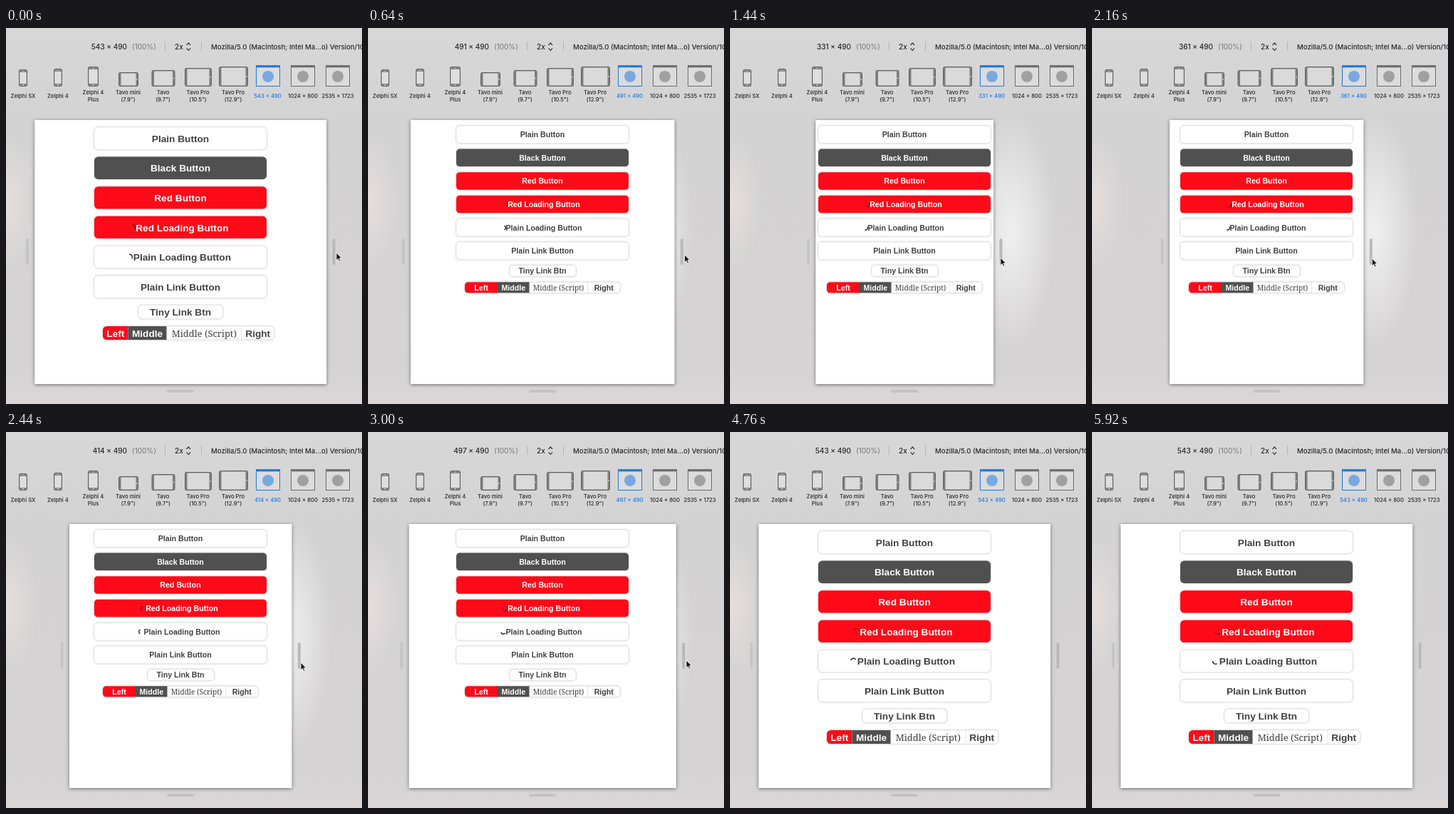
Write an HTML page that moves like this. It is 500x527 px and loops after 5960 ms.

```html
<!DOCTYPE html>
<html lang="en">
<head>
<meta charset="utf-8">
<title>Responsive buttons</title>
<style>
  html, body { margin: 0; width: 100%; height: 100%; overflow: hidden; background: #d5d4d5; }
  svg { display: block; width: 100vw; height: 100vh; }
  text { white-space: pre; }
  .ui { font-family: Inter, Roboto, sans-serif; font-weight: 500; fill: #262626; }
  .btn { font-family: "Liberation Sans", Arial, sans-serif; font-weight: 700; }
  .script { font-family: "Noto Serif", Georgia, serif; font-weight: 400; }
  #page { filter: drop-shadow(0 1px 2.5px rgba(0, 0, 0, .5)); }
  .raised { filter: drop-shadow(0 .8px .8px rgba(0, 0, 0, .26)); }
</style>
</head>
<body>
<svg id="stage" viewBox="0 0 500 527">
  <defs>
    <linearGradient id="base" x1="0" y1="0" x2="0" y2="1">
      <stop offset="0" stop-color="#d8d7d8"/>
      <stop offset=".25" stop-color="#d4d3d4"/>
      <stop offset=".9" stop-color="#d5d3d4"/>
      <stop offset="1" stop-color="#dbd6d7"/>
    </linearGradient>
    <radialGradient id="white">
      <stop offset="0" stop-color="#fff" stop-opacity=".65"/>
      <stop offset=".5" stop-color="#fff" stop-opacity=".35"/>
      <stop offset="1" stop-color="#fff" stop-opacity="0"/>
    </radialGradient>
    <radialGradient id="pink">
      <stop offset="0" stop-color="#f3e4e0" stop-opacity=".6"/>
      <stop offset="1" stop-color="#f3e4e0" stop-opacity="0"/>
    </radialGradient>
  </defs>
  <rect width="500" height="527" fill="url(#base)"/>
  <ellipse cx="395" cy="285" rx="62" ry="165" fill="url(#white)"/>
  <ellipse cx="0" cy="245" rx="45" ry="95" fill="url(#pink)"/>
</svg>
<script>
const LOOP = 5960, MID = 245.2, SCALE = 0.3775, BREAKPOINT = 500;
const RED = '#ff0a18', DARK = '#505050', INK = '#414143', BLUE = '#1b78e6';

// Rows of time, value.
const WIDTH = [[0, 543], [180, 542], [600, 499], [1000, 375], [1440, 331], [1700, 321],
  [1900, 326], [2440, 414], [3000, 497], [3320, 543], [LOOP, 543]];
const CURSOR_X = [[0, 464], [180, 463.5], [600, 448], [1000, 393], [1440, 380], [1700, 376],
  [1900, 379], [2440, 414], [3000, 447], [3320, 464], [3600, 461], [4200, 462], [LOOP, 462]];
const CURSOR_Y = [[0, 315], [1000, 320], [1440, 322], [2440, 323], [3000, 320], [3600, 316], [LOOP, 316]];
const CURSOR_GONE = 4520;

const stage = document.getElementById('stage');

function add(tag, attrs, parent = stage) {
  const el = document.createElementNS('http://www.w3.org/2000/svg', tag);
  for (const key in attrs) el.setAttribute(key, attrs[key]);
  parent.append(el);
  return el;
}

function box(x, y, width, height, fill, more = {}, parent = stage) {
  return add('rect', { x, y, width, height, fill, ...more }, parent);
}

function label(str, x, y, size, more = {}, parent = stage) {
  const el = add('text', { x, y, 'font-size': size, class: 'ui', 'text-anchor': 'middle', ...more }, parent);
  el.textContent = str;
  return el;
}

// Monotone cubic through the rows of a table.
function sample(rows, t) {
  let i = 0;
  while (i < rows.length - 2 && t >= rows[i + 1][0]) i++;
  const rise = k => (rows[k + 1][1] - rows[k][1]) / (rows[k + 1][0] - rows[k][0]);
  const slope = k => {
    if (k === 0 || k === rows.length - 1) return 0;
    const a = rise(k - 1), b = rise(k);
    return a * b > 0 ? 2 * a * b / (a + b) : 0;
  };
  const [t0, v0] = rows[i], [t1, v1] = rows[i + 1];
  const h = t1 - t0, u = (t - t0) / h, w = 1 - u;
  return v0 * (1 + 2 * u) * w * w + h * slope(i) * u * w * w
    + v1 * u * u * (3 - 2 * u) - h * slope(i + 1) * u * u * w;
}

// Toolbar
const sizeText = label('', 170, 29.5, 10, { 'text-anchor': 'end' });
label('(100%)', 177, 29.5, 10, { 'text-anchor': 'start', style: 'fill:#777;font-weight:400' });
label('2x', 237, 29.5, 10, { 'text-anchor': 'start' });
add('path', { d: 'M253.5 24 256.3 21 259 24M253.5 28.3 256.3 31.3 259 28.3', fill: 'none', stroke: '#333', 'stroke-width': 1.2 });
for (const x of [223, 274]) box(x, 19, 1, 13, '#b4b4b4');
label('Mozilla/5.0 (Macintosh; Intel Ma...o) Version/10', 288, 29.5, 9.6, { 'text-anchor': 'start' });

// Devices
function caption(lines, x) {
  lines.forEach((line, i) => label(line, x, lines.length > 1 ? 92.8 + i * 9.8 : 97.8, 7.7));
}

function phone(x, y, w) {
  const h = 82 - y;
  box(x + .5, y + .5, w - 1, h - 1, '#858585', { rx: 2, stroke: '#626262' });
  box(x + 1.3, y + 4, w - 2.6, h - 8, '#dedede');
  box(x + w / 2 - 1.5, y + 1.8, 3, .8, '#d5d5d5');
  add('circle', { cx: x + w / 2, cy: 80, r: 1, fill: '#dadada' });
}

function tablet(x, y, w) {
  const h = 82 - y;
  box(x + .5, y + .5, w - 1, h - 1, '#7e7e7e', { rx: 2, stroke: '#626262' });
  box(x + 3.5, y + 1.5, w - 7, h - 3, '#dadada');
  add('circle', { cx: x + w - 2, cy: y + h / 2, r: .9, fill: '#dadada' });
}

function browser(x, color, dot) {
  box(x + .5, 53, 33, 28.5, '#dcdcdd', { stroke: color });
  box(x, 52.3, 34, 3, color);
  add('circle', { cx: x + 17, cy: 68, r: 8, fill: dot });
}

[[18, 58, 12, 'Zelphi SX'], [67, 57, 12, 'Zelphi 4'], [115, 54, 15, 'Zelphi 4', 'Plus']]
  .forEach(([x, y, w, ...lines]) => { phone(x, y, w); caption(lines, x + w / 2); });
[[158, 62, 28, 'Tavo mini', '(7.9")'], [204.5, 59, 33, 'Tavo', '(9.7")'],
 [251, 56, 38, 'Tavo Pro', '(10.5")'], [299, 54, 41, 'Tavo Pro', '(12.9")']]
  .forEach(([x, y, w, ...lines]) => { tablet(x, y, w); caption(lines, x + w / 2 - .5); });
browser(351, BLUE, '#78a8e2');
browser(400, '#6b6b6b', '#a0a0a0');
browser(449, '#6b6b6b', '#a0a0a0');
const blueText = label('', 367.5, 97.8, 7.7, { style: 'fill:' + BLUE });
caption(['1024 × 800'], 417);
caption(['2535 × 1723'], 466);

// Resizable page
const page = box(0, 129, 0, 370, '#fff', { id: 'page' });
const leftGrip = box(0, 295, 4, 37, '#c6c5c6', { rx: 2 });
const rightGrip = box(0, 295, 4, 37, '#b9b9b9', { rx: 2 });
box(226, 507.3, 38, 3.6, '#c2c1c2', { rx: 1.8 });

const ROWS = [
  ['Plain Button', '#fff'], ['Black Button', DARK], ['Red Button', RED],
  ['Red Loading Button', RED], ['Plain Loading Button', '#fff'], ['Plain Link Button', '#fff']
];
const CELLS = [['Left', RED], ['Middle', DARK], ['Middle (Script)', '#fff'], ['Right', '#fff']];
const WIDE = { top: 139, pitch: 41.6, height: 31.3, font: 13.65, script: 12.9, radius: 5.5,
  tiny: [186, 388.3, 118.5, 19.2], cells: [136, 171.5, 225.5, 331, 376.5], cellY: 418, cellH: 19,
  spin: [177.5, 173.5], spinR: 4, textX: 247.4 };
const SMALL = { top: 137, pitch: 32.6, height: 24.5, font: 10.65, script: 10.1, radius: 4.5,
  tiny: [199, 332.6, 93, 15.6], cells: [136, 182, 226.5, 308.5, 354], cellY: 356.2, cellH: 15,
  spin: [193, 190], spinR: 3.4, textX: 247 };

function buildLayout(o) {
  const g = add('g', {});
  const spinners = [];
  const ink = fill => fill === '#fff' ? INK : '#fff';
  const write = (str, x, mid, fill) =>
    label(str, x, mid + o.font * .36, o.font, { class: 'btn', fill: ink(fill) }, g);
  const raised = (x, y, w, h, fill) => {
    const edge = fill === '#fff' ? '#e2e2e2' : 'none';
    box(x, y, w, h, fill, { rx: o.radius, class: 'raised', stroke: edge, 'stroke-width': .6 }, g);
  };

  ROWS.forEach(([str, fill], i) => {
    const y = o.top + i * o.pitch, mid = y + o.height / 2 + .2;
    const loading = str.includes('Loading');
    raised(124, y, 242, o.height, fill);
    write(str, loading ? o.textX : 245, mid, fill);
    if (!loading) return;
    const x = o.spin[i - 3], r = o.spinR, c = r * Math.cos(1.1), s = r * Math.sin(1.1);
    const el = add('path', { d: `M${c} ${-s}A${r} ${r} 0 0 1 ${c} ${s}`, fill: 'none',
      stroke: fill === RED ? '#5c1418' : '#262626', 'stroke-width': fill === RED ? 1 : 1.4 }, g);
    spinners.push([el, x, mid]);
  });

  const [tx, ty, tw, th] = o.tiny;
  raised(tx, ty, tw, th, '#fff');
  write('Tiny Link Btn', 245, ty + th / 2 + .1, '#fff');

  const x0 = o.cells[0], x4 = o.cells[4], r = o.radius, y = o.cellY, h = o.cellH;
  raised(x0, y, x4 - x0, h, '#fff');
  CELLS.forEach(([str, fill], i) => {
    const x = o.cells[i], w = o.cells[i + 1] - x, mid = y + h / 2 + .1;
    if (i === 0) add('path', { d: `M${x + w} ${y}v${h}H${x + r}a${r} ${r} 0 0 1 ${-r} ${-r}V${y + r}a${r} ${r} 0 0 1 ${r} ${-r}z`, fill }, g);
    if (i === 1) box(x, y, w, h, fill, {}, g);
    if (i === 3) box(x - .4, y, .8, h, '#dedede', {}, g);
    const el = write(str, x + w / 2, mid, fill);
    if (i === 2) {
      el.setAttribute('class', 'script');
      el.setAttribute('font-size', o.script);
    }
  });
  return { g, spinners };
}

const wide = buildLayout(WIDE), small = buildLayout(SMALL);

const cursor = add('path', { d: 'M0 0V10.6L2.4 8.4 4 12 5.7 11.2 4.2 7.7H7.4Z', fill: '#111', stroke: '#fff', 'stroke-width': .8 });

function draw(t) {
  const width = Math.round(sample(WIDTH, t)), half = width * SCALE;
  const isWide = width > BREAKPOINT;
  const size = `${width} × 490`;
  sizeText.textContent = size;
  blueText.textContent = size;
  page.setAttribute('x', MID - half);
  page.setAttribute('width', half * 2);
  leftGrip.setAttribute('x', MID - half - 12.3);
  rightGrip.setAttribute('x', MID + half + 8.3);

  wide.g.style.display = isWide ? '' : 'none';
  small.g.style.display = isWide ? 'none' : '';
  // The spinner restarts when the layout first switches.
  const angle = t * .5 - 320 - (isWide && t < 1000 ? 70 : 0);
  for (const [el, x, y] of (isWide ? wide : small).spinners)
    el.setAttribute('transform', `translate(${x} ${y}) rotate(${angle})`);

  cursor.style.display = t < CURSOR_GONE ? '' : 'none';
  cursor.setAttribute('transform', `translate(${sample(CURSOR_X, t)} ${sample(CURSOR_Y, t)})`);
}

const start = performance.now();
function tick() {
  draw((performance.now() - start) % LOOP);
  requestAnimationFrame(tick);
}
tick();
</script>
</body>
</html>
```
